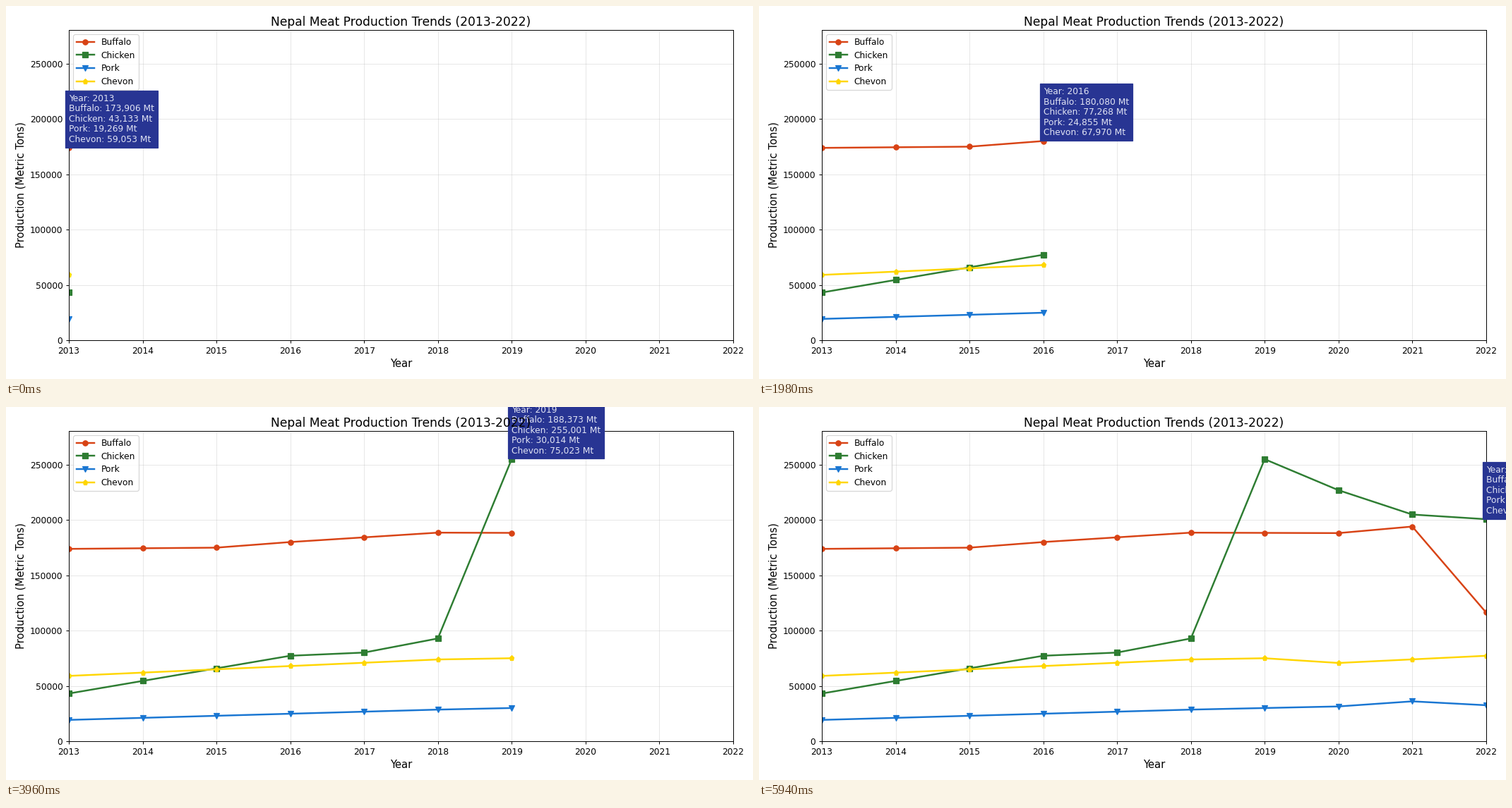
Recreate the animation shown at these times as a matplotlib script. Size 1058 px wide and 529 px high, loop 6.6 s.

```python
import matplotlib.pyplot as plt
import numpy as np
from matplotlib.animation import FuncAnimation

plt.rcParams["font.family"] = "DejaVu Sans"

WIDTH, HEIGHT = 1058, 529
DPI = WIDTH / 12
STEP_MS = 660
LABEL_GAP = 3500
INDIGO = "#283593"

years = np.arange(2013, 2023)


def trend(**turns):
    """Yearly tons, rising or falling steadily between turning points (y13=...)."""
    when = [2000 + int(key[1:]) for key in turns]
    return np.interp(years, when, list(turns.values())).round().astype(int)


# name: (color, marker, yearly production in metric tons)
series = {
    "Buffalo": ("#D84315", "o", trend(y13=173906, y15=175005, y16=180080, y18=188574,
                                      y20=188172, y21=194100, y22=116400)),
    "Chicken": ("#2E7D32", "s", trend(y13=43133, y16=77268, y17=80150, y18=92899,
                                      y19=255001, y20=226959, y21=204960, y22=200750)),
    "Pork": ("#1976D2", "v", trend(y13=19269, y18=28579, y20=31450,
                                   y21=36050, y22=32550)),
    "Chevon": ("#FFD600", "p", trend(y13=59053, y18=73914, y19=75023,
                                     y20=70755, y22=77250)),
}
tops = np.max([tons for _, _, tons in series.values()], axis=0)

fig, ax = plt.subplots(figsize=(WIDTH / DPI, HEIGHT / DPI), dpi=DPI)
fig.subplots_adjust(left=89 / WIDTH, right=1029.8 / WIDTH,
                    bottom=1 - 474 / HEIGHT, top=1 - 34 / HEIGHT)

lines = {
    name: ax.plot([], [], color=color, marker=marker, linewidth=2, label=name)[0]
    for name, (color, marker, _) in series.items()
}

ax.set_xlim(years[0], years[-1])
ax.set_ylim(0, tops.max() * 1.1)
ax.set_xticks(years)
ax.set_title("Nepal Meat Production Trends (2013-2022)", fontsize=14, pad=4.9)
ax.set_xlabel("Year", fontsize=12)
ax.set_ylabel("Production (Metric Tons)", fontsize=12)
ax.grid(True, alpha=0.3)
ax.legend(loc="upper left", labelspacing=0.46)

tooltip = ax.text(years[0], 0, "", fontsize=10, color="#E0E3F3",
                  ha="left", va="bottom", linespacing=1.145,
                  bbox=dict(facecolor=INDIGO, edgecolor=INDIGO, pad=4))


def update(i):
    rows = [f"Year: {years[i]}"]
    for name, (_, _, tons) in series.items():
        lines[name].set_data(years[:i + 1], tons[:i + 1])
        rows.append(f"{name}: {tons[i]:,} Mt")
    tooltip.set_position((years[i], tops[i] + LABEL_GAP))
    tooltip.set_text("\n".join(rows))
    return [*lines.values(), tooltip]


anim = FuncAnimation(fig, update, frames=len(years), init_func=lambda: update(0),
                     interval=STEP_MS, repeat=True, repeat_delay=0, blit=False)
plt.show()
```
